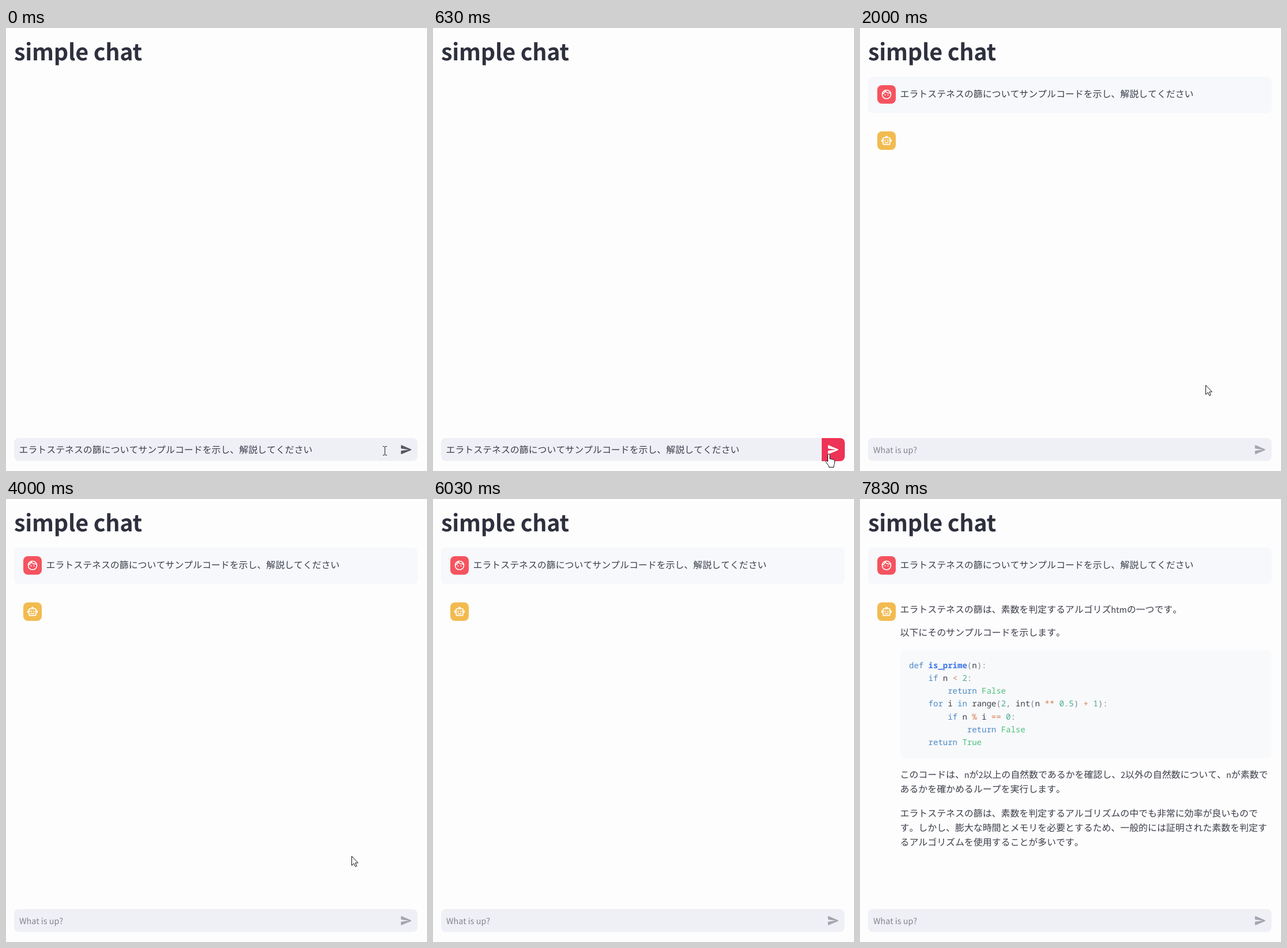
An HTML page for the animation above (8 s loop, 730 by 767 pixels).

```html
<!DOCTYPE html>
<html lang="ja">
<head>
<meta charset="utf-8">
<title>simple chat</title>
<style>
  html, body { margin: 0; width: 100%; height: 100%; overflow: hidden; background: #fdfdfd; }
  svg { display: block; width: 730px; height: 767px; }
  text { font: 350 15.92px "Noto Sans CJK JP", "Noto Sans CJK", sans-serif; fill: #3b3d49; white-space: pre; font-kerning: none; text-rendering: geometricPrecision; }
  .latin { font-size: 14.3px; font-weight: 400; }
  #title { font-size: 39.4px; font-weight: 700; fill: #2e303e; letter-spacing: -.2px; font-kerning: auto; }
  #hint { fill: #83848f; }
  #code text { font-family: inherit; font-size: inherit; font-weight: 400; }
  #code text .name { fill: #3a76e4; font-weight: 700; }
  .keyword { fill: #4a88c4; }
  .bool { fill: #4cc07c; }
  .number { fill: #48ae92; }
  .operator { fill: #d27c50; }
  .punct { fill: #80838f; }
  .icon { fill: none; stroke: #fff; stroke-width: 2; }
  .icon .solid { fill: #fff; stroke: none; }
  .cursor { fill: #fff; stroke: #111; stroke-linejoin: round; }
</style>
</head>
<body>
<svg viewBox="0 0 730 767">
  <text id="title" class="latin" x="14" y="56">simple chat</text>

  <g id="question">
    <rect x="14" y="84" width="699.5" height="63.5" rx="8" fill="#f6f8fb"/>
    <rect x="30" y="99" width="32" height="32" rx="8" fill="#f5535f"/>
    <g class="icon" transform="translate(36 105) scale(.833)">
      <circle cx="12" cy="12" r="9"/>
      <path d="M3.6 10.9C6.6 9.8 8.6 7.8 9.4 4.6C11 7.4 14 9 17.5 9Q18.8 9 20 8.7"/>
      <g class="solid"><circle cx="9" cy="13" r="1.25"/><circle cx="15" cy="13" r="1.25"/></g>
    </g>
  </g>

  <g id="bot">
    <rect x="30" y="179" width="32" height="32" rx="8" fill="#f2bb50"/>
    <g class="icon" transform="translate(36 185) scale(.833)">
      <rect x="5" y="6" width="14" height="14" rx="1"/>
      <g class="solid">
        <path d="M9 5a3 3 0 0 1 6 0zM4 9a3 3 0 0 0 0 6zM20 9a3 3 0 0 1 0 6zM8 15h8v2H8z"/>
        <circle cx="9" cy="11.5" r="1.5"/><circle cx="15" cy="11.5" r="1.5"/>
      </g>
    </g>
  </g>

  <g id="answer">
    <rect x="70" y="262" width="643.5" height="187" rx="8" fill="#f8f9fb"/>
    <g id="code"></g>
  </g>

  <rect x="14" y="710" width="699.5" height="39.5" rx="8" fill="#eff0f6"/>
  <g id="draft"></g>
  <text id="hint" class="latin" x="23" y="736">What is up?</text>
  <path id="button" d="M674 710h32a8 8 0 0 1 8 8v24a8 8 0 0 1-8 8h-32z" fill="#ed3356"/>
  <path id="send" transform="translate(683 719) scale(.92)" d="M3.4 20.4l17.45-7.48c.81-.35.81-1.49 0-1.84L3.4 3.6c-.66-.29-1.39.2-1.39.91L2 9.12c0 .5.37.93.87.99L17 12 2.87 13.88c-.5.07-.87.5-.87 1l.01 4.61c0 .71.73 1.2 1.39.91z"/>

  <!-- Each cursor has its hot spot at 0,0 -->
  <path id="beam" class="cursor" fill="none" d="M-3.5-7.5h2.5l1 1 1-1h2.5M0-6.5V6.5M-3.5 7.5h2.5l1-1 1 1h2.5"/>
  <path id="hand" class="cursor" d="M-.5 13V1.5a1.8 1.8 0 0 1 3.6 0V8.5a1.7 1.7 0 0 1 3 .5 1.7 1.7 0 0 1 2.8.8 1.5 1.5 0 0 1 2.6 1.2V15c0 2-1.5 3.5-1.5 5v2.5H1.5v-2L-3.7 13.5c-1-1.7.8-2.9 2-1.8z"/>
  <path id="arrow" class="cursor" d="M.5.5V16.5L4.3 13 6.8 18.6 9.2 17.5 6.8 12H11.5z"/>
</svg>

<script>
const DURATION = 8000;
const CLICK = 1370, BOT = 1430, ANSWER = 7500, FONT_READY = 7600;
const PROMPT = 'エラトステネスの篩についてサンプルコードを示し、解説してください';

const ANSWER_LINES = [
  [197, 'エラトステネスの篩は、素数を判定するアルゴリズhtmの一つです。'],
  [237, '以下にそのサンプルコードを示します。'],
  [483, 'このコードは、nが2以上の自然数であるかを確認し、2以外の自然数について、nが素数で'],
  [508, 'あるかを確かめるループを実行します。'],
  [550, 'エラトステネスの篩は、素数を判定するアルゴリズムの中でも非常に効率が良いもので'],
  [575, 'す。しかし、膨大な時間とメモリを必要とするため、一般的には証明された素数を判定す'],
  [600, 'るアルゴリズムを使用することが多いです。'],
];

const CODE = `def is_prime(n):
    if n < 2:
        return False
    for i in range(2, int(n ** 0.5) + 1):
        if n % i == 0:
            return False
    return True`;

const FALLBACK_FONT = '14px "Noto Sans Mono CJK JP", monospace';
const CODE_FONT = '14px "Noto Sans Mono", monospace';

const TOKENS = {
  keyword: /\b(?:def|if|return|for|in)\b/,
  name: /is_prime/,
  bool: /True|False/,
  number: /\d+(?:\.\d+)?/,
  operator: /[<*%=+]+/,
  punct: /[():,]/,
};

const el = id => document.getElementById(id);
const show = (id, on) => el(id).setAttribute('visibility', on ? 'visible' : 'hidden');
const span = (type, s) => `<tspan class="${type}">${s.replace(/</g, '&lt;')}</tspan>`;

function addText(parent, x, y, markup) {
  const node = document.createElementNS('http://www.w3.org/2000/svg', 'text');
  node.setAttribute('x', x);
  node.setAttribute('y', y);
  node.innerHTML = markup;
  el(parent).append(node);
}

const prose = s => s.replace(/[a-z0-9]+/g, word => span('latin', word));

const tokenPattern = new RegExp(
  Object.entries(TOKENS).map(([type, re]) => `(?<${type}>${re.source})`).join('|'), 'g');

function highlight(line) {
  return line.replace(tokenPattern, (token, ...rest) => {
    const groups = rest.at(-1);
    return span(Object.keys(groups).find(type => groups[type]), token);
  });
}

addText('question', 69.5, 120, PROMPT);
addText('draft', 22.5, 736, PROMPT);
ANSWER_LINES.forEach(([y, line]) => addText('answer', 69.5, y, prose(line)));
CODE.split('\n').forEach((line, i) => addText('code', 85, 292.7 + 22.25 * i, highlight(line)));

const ease = p => p * p * (3 - 2 * p);

function pointer(t) {
  if (t < CLICK) {
    const p = ease(Math.min(1, Math.max(0, (t - 440) / 190)));
    const x = 657 + 28 * p, y = 732 + 6 * p;
    return [x < 674 ? 'beam' : 'hand', x, y];
  }
  if (t < 1830) return ['arrow', 685, 739];
  if (t < 2000) return ['arrow', 688, 731];
  if (t < 4170) return ['arrow', 599, 618];
  if (t < 4400) return ['arrow', 598, 613];
  if (t < 4430) return ['arrow', 550, 330];
  if (t < 4470) return ['arrow', 478, 9];
  return [];
}

function draw(t) {
  const sent = t >= CLICK;
  const [kind, x, y] = pointer(t);
  const hover = kind === 'hand';

  show('question', sent);
  show('bot', t >= BOT);
  show('answer', t >= ANSWER);
  show('draft', !sent);
  show('hint', sent);
  show('button', hover);
  el('send').setAttribute('fill', sent ? '#a4a5b0' : hover ? '#fff' : '#565864');
  el('code').style.font = t < FONT_READY ? FALLBACK_FONT : CODE_FONT;

  for (const id of ['beam', 'hand', 'arrow']) show(id, id === kind);
  if (kind) el(kind).setAttribute('transform', `translate(${x} ${y})`);
}

const start = performance.now();
function tick() {
  draw((performance.now() - start) % DURATION);
  requestAnimationFrame(tick);
}
tick();
</script>
</body>
</html>
```
